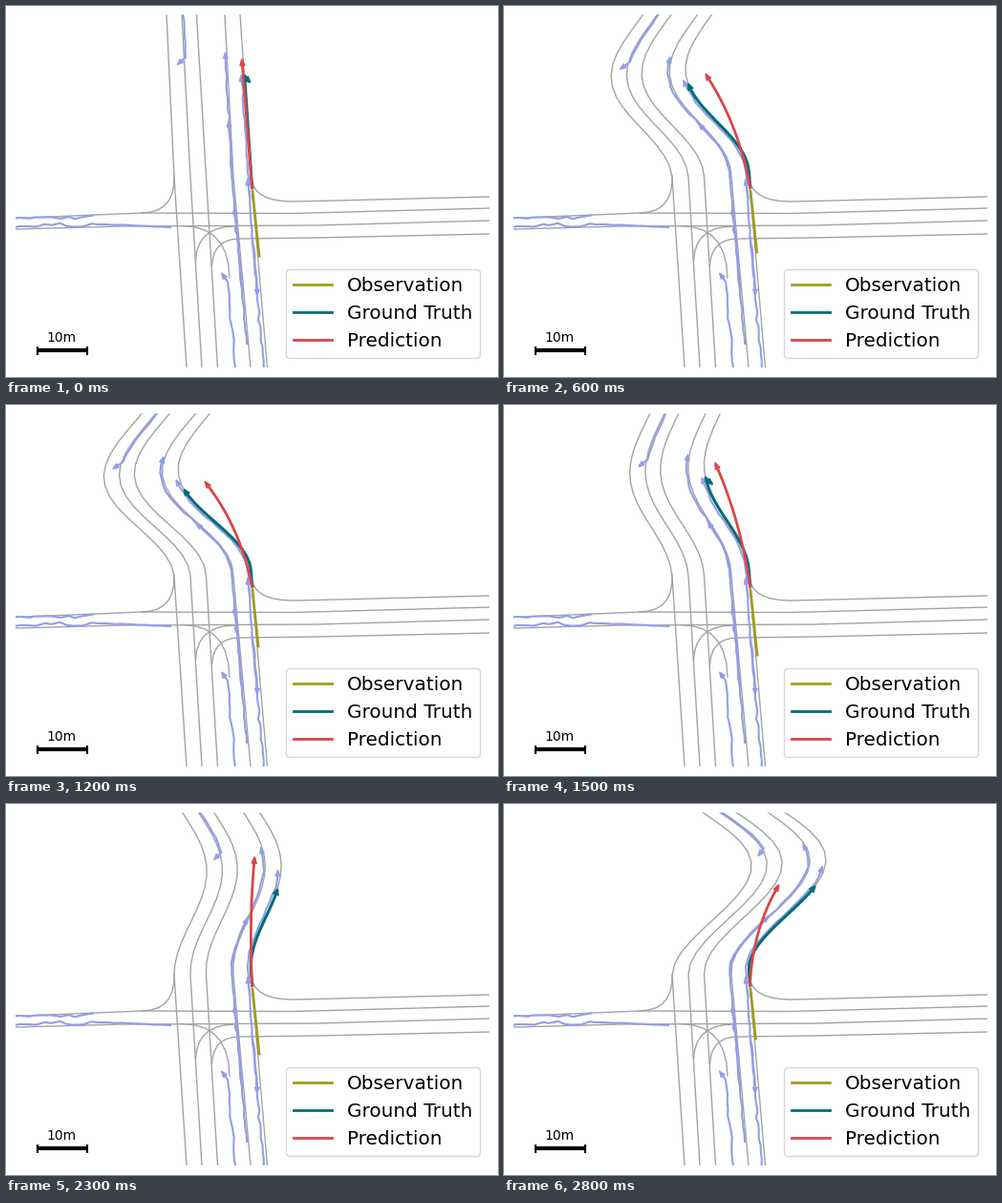
Animation of 515 by 389 pixels, one loop 2.9 s. Source, as a matplotlib script:

```python
import numpy as np
import matplotlib.pyplot as plt
from matplotlib.animation import FuncAnimation
from matplotlib.patches import Polygon

W, H, DPI = 515, 389, 100
GRAY, BLUE = "#a3a3a3", "#929deb"
OLIVE, TEAL, RED = "#a39a1c", "#006d74", "#dc4648"

# Road bend: points ahead of the car slide sideways along a raised cosine.
CAR = np.array([258.0, 192.0])
AHEAD = np.array([-0.085, -1.0])
SIDE = np.array([1.0, -0.085])
START, HALF_WAVE, SHIFT = 17.5, 111, 9.8

# Where each lane crosses these heights.
LANE_Y = [-21, 179, 379]
LANE_X = [(166.6, 176, 189), (182.4, 193, 205), (197.7, 209.5, 221.5),
          (227.4, 238, 256), (243, 256.5, 273.5)]

rng = np.random.default_rng(4)
plt.rcParams["font.family"] = "DejaVu Sans"
fig = plt.figure(figsize=(W / DPI, H / DPI), dpi=DPI, facecolor="white")
ax = fig.add_axes([10 / W, 10 / H, 496 / W, 370 / H])
ax.set_xlim(10, 506)
ax.set_ylim(379, 9)
ax.axis("off")


def straight(a, b, step=7, jitter=0.0):
    a, b = np.array(a, float), np.array(b, float)
    n = max(2, int(np.hypot(*(b - a)) / step) + 1)
    pts = a + (b - a) * np.linspace(0, 1, n)[:, None]
    pts[1:-1] += rng.normal(0, 1, (n - 2, 2)) * jitter
    return pts


def along(lane, y0, y1, offset=0.0, step=7, jitter=0.0):
    pts = straight((offset, y0), (offset, y1), step, jitter)
    pts[:, 0] += np.interp(pts[:, 1], LANE_Y, LANE_X[lane])
    return pts


def curve(a, ctrl, b, n=8):
    t = np.linspace(0, 1, n)[:, None]
    a, ctrl, b = np.array(a), np.array(ctrl), np.array(b)
    return (1 - t) ** 2 * a + 2 * t * (1 - t) * ctrl + t ** 2 * b


def bend(pts, k):
    s = np.maximum((pts - CAR) @ AHEAD - START, 0)
    d = k * SHIFT * np.sin(np.pi * s / (2 * HALF_WAVE)) ** 2
    return pts + d[:, None] * SIDE


def cut(pts, part):
    return pts[:max(2, int(round(len(pts) * part)))]


def head_shape(pts, length, width):
    tip = pts[-1]
    d = tip - pts[-2]
    d = d / np.hypot(*d)
    n = np.array([-d[1], d[0]]) * width / 2
    base = tip - d * length * 0.6
    return [tip + d * length * 0.4, base + n, base - n]


class Track:
    def __init__(self, color, lw, z, size=None):
        self.size = size
        self.line, = ax.plot([], [], color=color, lw=lw, zorder=z,
                             solid_joinstyle="round")
        if size:
            self.head = ax.add_patch(Polygon(np.zeros((3, 2)), fc=color,
                                             ec=color, lw=0.8, zorder=z))

    def show(self, pts):
        self.line.set_data(pts[:, 0], pts[:, 1])
        if self.size:
            self.head.set_xy(head_shape(pts, *self.size))


# Cross street: lanes and the turns that join them.
corner = curve((142, 217), (177.5, 216.5), (176, 178))
CROSSING = [
    np.vstack([(10, 222.5), corner]),
    np.array([(142, 217), (300, 217.5), (506, 212)]),
    np.array([(10, 234), (120, 231), (325, 230), (506, 225)]),
    np.vstack([curve((256.5, 180), (259, 205), (300, 205)),
               (325, 204.5), (506, 200)]),
    np.vstack([(506, 239), (325, 243),
               curve((245, 244), (217, 244), (215.5, 272))]),
    curve((240, 231), (200, 231), (198.5, 267)),
    curve((185, 230.5), (233, 231), (234, 285)),
]
for path in CROSSING:
    Track(GRAY, 1, 1).show(path)

for a, b in [((6, 222.5), (91, 219.5)), ((6, 232.5), (105, 229)),
             ((105, 229), (172, 232))]:
    wobble = 1.4 if a[0] < 10 else 0.4
    Track(BLUE, 1.5, 2).show(straight(a, b, 8, wobble))

# Other cars: lane, first and last height, distance from the lane line.
DRIVES = [(3, 180, 51, -1.5), (3, 295, 123, -1.7), (3, 354, 214, -1.7),
          (4, 379, 184, -3.8), (4, 243, 301, -4), (4, 200, 75, -3.3)]
traffic = [along(*d, jitter=0.5) for d in DRIVES]
traffic.append(np.vstack([along(1, -14, 54, 1.5, jitter=0.4), (181, 60)]))
traffic.append(np.vstack([straight((240, 379), (232, 289), jitter=0.5),
                          (227, 282)]))

moving = [(Track(GRAY, 1, 1), along(i, -21, 379, step=11)) for i in range(5)]
moving += [(Track(BLUE, 1.5, 2, (6.5, 5)), path) for path in traffic]

past = Track(OLIVE, 2, 3)
truth = Track(TEAL, 2.2, 4, (6.5, 6))
guess = Track(RED, 2, 5, (7, 5.5))
past_path = straight((258, 194), (265, 262), 1)
truth_path = along(4, 190, 73, 0.3, step=3)
truth_tail = np.array([(251.5, 76), (254, 78.5)])


def polar(origin, length, degrees):
    a = np.radians(degrees)
    return origin + length * np.array([np.sin(a), -np.cos(a)])


def guess_path(k, speed):
    origin = np.array([257.5, 190])
    length = 132 * (0.2 + 0.8 * speed)
    turn = np.interp(k, [-9, 0, 4, 9], [-25, 0, 5.6, 20.2])
    ctrl = polar(origin, 0.53 * length, 0.34 * turn - 4.5)
    return curve(origin, ctrl, polar(origin, length, turn - 4.5), 14)


def bend_step(i):
    return -i if i < 10 else i - 19


def draw(i):
    k = bend_step(i)
    for track, path in moving:
        track.show(bend(path, k))
    # Sharper bends force a lower speed, so the paths get shorter.
    speed = min(1, 0.81 * np.sqrt(8 / max(abs(k), 1)))
    past.show(cut(past_path, speed))
    part = np.interp(k, [-8, -5, 0, 4], [0.86, 1, 1, 0.83])
    path = cut(truth_path, part)
    if part == 1:
        path = np.vstack([path, truth_tail])
    truth.show(bend(path, k))
    guess.show(guess_path(k, speed))
    return []


ax.plot([32, 85], [361, 361], color="black", lw=3, solid_capstyle="butt")
for x in (32.5, 84.5):
    ax.plot([x, x], [356.5, 365.5], color="black", lw=1.5,
            solid_capstyle="butt")
ax.text(57.7, 352, "10m", fontsize=10, ha="center", va="baseline")

names = ["Observation", "Ground Truth", "Prediction"]
handles = [plt.Line2D([], [], color=c, lw=2) for c in (OLIVE, TEAL, RED)]
ax.legend(handles, names, loc="lower right", fontsize="x-large").set_zorder(6)

anim = FuncAnimation(fig, draw, frames=29, interval=100, repeat=True,
                     repeat_delay=0, blit=False)
plt.show()
```
